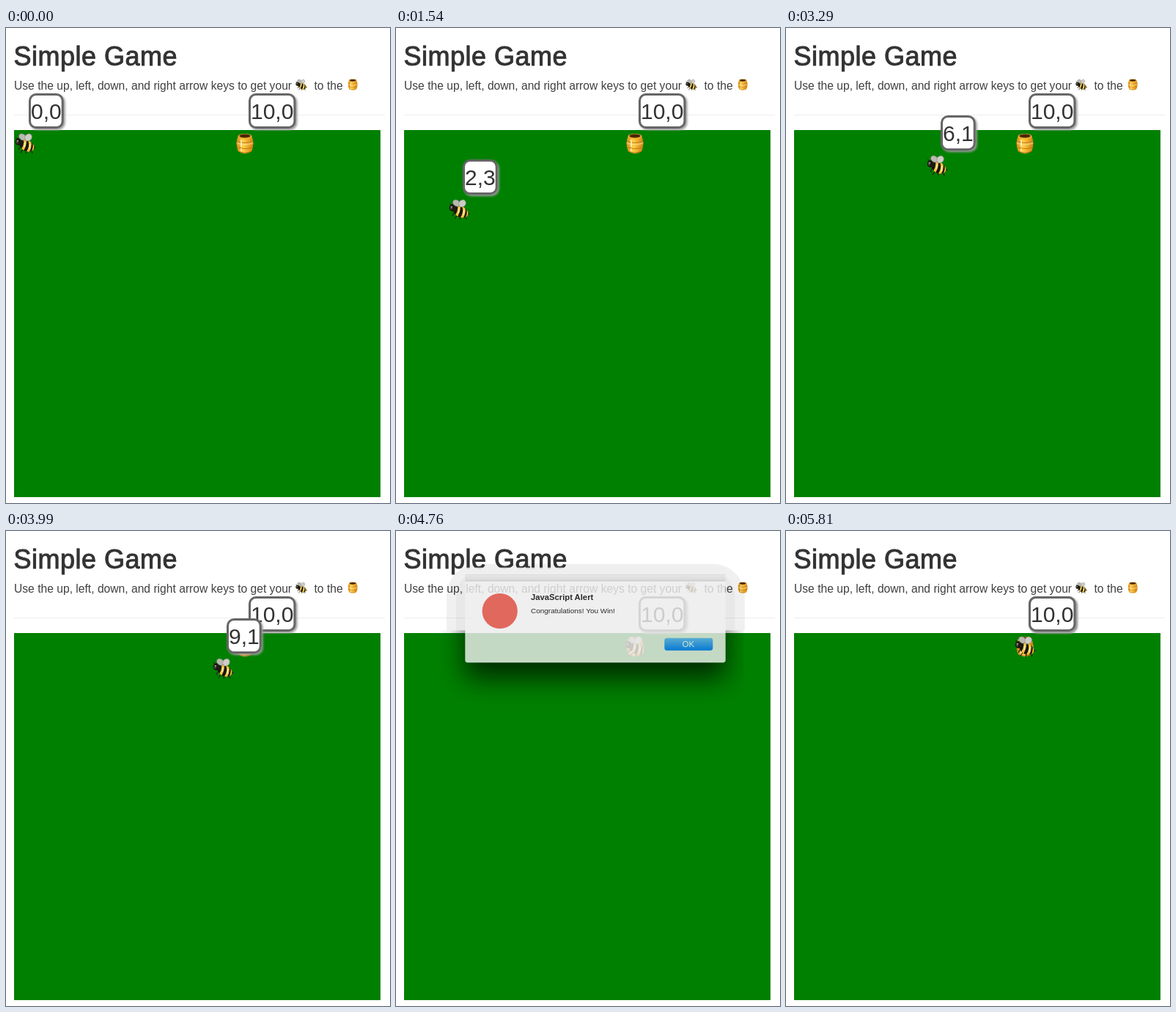
These frames come from a looping animation (524 px wide and 647 px high, 6.65 s). An HTML page:

```html
<!DOCTYPE html>
<html lang="en">
<head>
<meta charset="utf-8">
<title>Simple Game</title>
<style>
  html, body { margin: 0; width: 100%; height: 100%; overflow: hidden; background: #fff; }
  svg { display: block; }
  text { font-family: "Liberation Sans", Arial, sans-serif; fill: #333; }
  .title { font-size: 36px; letter-spacing: .5px; stroke: #333; stroke-width: 1px; }
  .intro { font-size: 15.65px; fill: #404040; }
  .label text { font-size: 30px; }
  .label rect { fill: #fff; stroke: #666; stroke-width: 3px; }
  .label { filter: drop-shadow(2.5px 2.5px 1.5px #999); }
  #dialog text { fill: #000; }
  #shadow { filter: blur(22px); }
</style>
</head>
<body>
<svg width="524" height="647" viewBox="0 0 524 647">
  <defs>
    <linearGradient id="honey">
      <stop offset="0" stop-color="#d98a16"/>
      <stop offset=".4" stop-color="#ffcf45"/>
      <stop offset="1" stop-color="#d07f12"/>
    </linearGradient>
    <linearGradient id="button" x2="0" y2="1">
      <stop offset="0" stop-color="#6cb6fb"/>
      <stop offset="1" stop-color="#0a78ff"/>
    </linearGradient>
    <linearGradient id="bar" x2="0" y2="1">
      <stop offset="0" stop-color="#e2e2e2"/>
      <stop offset="1" stop-color="#d2d2d2"/>
    </linearGradient>
    <clipPath id="onPage"><path d="M0 0H524V139H0z"/></clipPath>
    <clipPath id="onBoard"><path d="M11 139H511V300H11z"/></clipPath>
    <clipPath id="abdomen"><ellipse cx="17.5" cy="18.5" rx="10.5" ry="7.4" transform="rotate(26 17.5 18.5)"/></clipPath>

    <g id="bee">
      <path d="M9 18l-3 6M13 22l-4 6M18 24l-2 5M24 26l1 3" stroke="#2a2412" stroke-width="1.3" fill="none"/>
      <path d="M25 18l5 3-5 3z" fill="#2a2412"/>
      <g clip-path="url(#abdomen)">
        <path d="M5 5H31V31H5z" fill="#17150f"/>
        <path d="M14.5 9q2 7-3 15M21 11q3 8-3 17M27 15q2 7-3 14" stroke="#f3c440" stroke-width="3.6" fill="none"/>
        <path d="M15 14q0 3-1 6M21.8 16q0 4-1 7" stroke="#fff0b0" stroke-width="1.4" fill="none"/>
      </g>
      <circle cx="6.5" cy="13" r="4.9" fill="#1d1a12"/>
      <path d="M5 9L2 7M8 8L6 4" stroke="#1d1a12"/>
      <ellipse cx="4.4" cy="13" rx="1.6" ry="2.4" fill="#4b4a40"/>
      <circle cx="5" cy="11.8" r=".8" fill="#eee"/>
      <g stroke="#8d8d84" stroke-width=".6">
        <ellipse cx="11.5" cy="6.5" rx="5.4" ry="4" transform="rotate(35 11.5 6.5)" fill="#b9b9b0"/>
        <ellipse cx="19.5" cy="7" rx="5.2" ry="4.5" transform="rotate(-50 19.5 7)" fill="#cdcdc6"/>
      </g>
    </g>

    <g id="pot">
      <path d="M6 5Q1 15 6 26Q15 32 24 26Q29 15 24 5z" fill="url(#honey)"/>
      <path d="M3.8 13q11 4 22.4 0v3q-11 4-22.4 0z" fill="#ffe596" opacity=".45"/>
      <path d="M4 12.5q11 4 22 0M4.2 20.5q11 4 21.6 0M6 26q9 4 18 0" stroke="#b8640c" stroke-width=".8" fill="none"/>
      <ellipse cx="15" cy="5.5" rx="9.6" ry="3.6" fill="#efae35"/>
      <ellipse cx="15" cy="5" rx="7.6" ry="2.4" fill="#4a2508"/>
      <path d="M10 10v10M10 22v4" stroke="#fff3c0" stroke-width="1.6"/>
    </g>
  </defs>

  <text class="title" x="10.5" y="51">Simple Game</text>
  <text class="intro" x="11" y="83.7">Use the up, left, down, and right arrow keys to get your</text>
  <use href="#bee" transform="translate(394.5 69) scale(.55)"/>
  <text class="intro" x="420.5" y="83.7">to the</text>
  <use href="#pot" transform="translate(464.8 68.5) scale(.56)"/>
  <path d="M11 118.5H517" stroke="#eee"/>
  <path d="M11 139h500v500h-500z" fill="green"/>

  <g id="goal"><use href="#pot" x="11" y="142"/></g>
  <g id="player"><use href="#bee" x="11" y="142"/></g>

  <g id="dialog">
    <g clip-path="url(#onPage)" opacity=".075">
      <rect x="32" y="32" width="481" height="240" rx="52"/>
    </g>
    <g clip-path="url(#onPage)" opacity=".04">
      <rect x="47" y="44" width="450" height="220" rx="40"/>
    </g>
    <g clip-path="url(#onBoard)">
      <rect id="shadow" x="62" y="62" width="420" height="154" opacity=".82"/>
    </g>
    <rect x="62" y="38" width="420" height="153" rx="4" fill="#ececec"/>
    <path d="M62 49.5h420v10h-420z" fill="url(#bar)"/>
    <path d="M62 49.5h420" stroke="#d4d4d4"/>
    <path d="M62 59.5h420" stroke="#b4b4b4"/>
    <circle cx="118" cy="108" r="28.5" fill="#dc4a3c"/>
    <text x="168" y="89.8" font-size="13.3" font-weight="bold">JavaScript Alert</text>
    <text x="168" y="112" font-size="11.8">Congratulations! You Win!</text>
    <rect x="383.5" y="151.5" width="78" height="20" rx="4" fill="url(#button)"/>
    <text x="422" y="166.3" font-size="13.6" text-anchor="middle" style="fill:#fff">OK</text>
  </g>
</svg>
<script>
const LOOP = 6650, TICK = 70;
const OPEN = 4620, OPENED = 4830, CLOSING = 5740, CLOSED = 5810;
const times = [560, 980, 1120, 1330, 1540, 1750, 1960, 2240,
               2590, 2800, 3290, 3500, 3640, 3990, 4270, 4620];
const steps = "RDDDRRRRURURRRUR";
const $ = id => document.getElementById(id);

function addLabel(piece) {
  piece.insertAdjacentHTML("beforeend",
    '<g class="label"><rect x="32.5" y="90.5" height="45" rx="8.5"/><text x="34" y="123.8"></text></g>');
}

function place(piece, x, y) {
  const label = `${x},${y}`;
  piece.setAttribute("transform", `translate(${30 * x} ${30 * y})`);
  piece.querySelector("text").textContent = label;
  piece.querySelector("rect").setAttribute("width", 44.7 + 16.7 * (label.length - 3));
}

function showDialog(t) {
  const dialog = $("dialog");
  const visible = t >= OPEN && t < CLOSED;
  dialog.style.display = visible ? "" : "none";
  if (!visible) return;
  const tick = Math.floor((t - OPEN) / TICK) * TICK;
  const progress = Math.min(1, tick / (OPENED - OPEN));
  const grow = 1 - (1 - progress) ** 1.5;
  const scale = .2 + .8 * grow;
  dialog.setAttribute("transform", `translate(272 114.5) scale(${scale}) translate(-272 -114.5)`);
  dialog.setAttribute("opacity", t >= CLOSING ? .5 : .13 + .87 * grow);
}

function draw() {
  const t = performance.now() % LOOP;
  let x = 0, y = 0;
  times.forEach((time, i) => {
    if (t < time) return;
    if (steps[i] === "R") x++;
    else y += steps[i] === "D" ? 1 : -1;
  });
  place($("player"), x, y);
  showDialog(t);
  requestAnimationFrame(draw);
}

addLabel($("goal"));
addLabel($("player"));
place($("goal"), 10, 0);
draw();
</script>
</body>
</html>
```
